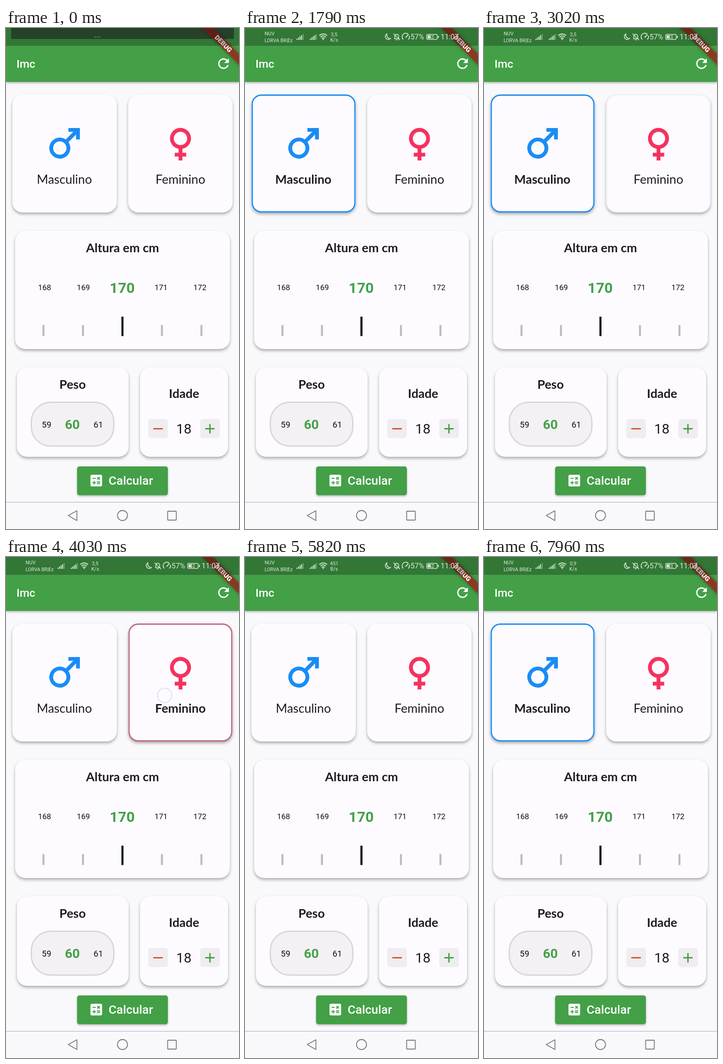
Recreate the animation shown at these times as an HTML page. Size 511 by 1097 pixels, loop 8000 ms.

```html
<!DOCTYPE html>
<html lang="pt">
<head>
<meta charset="utf-8">
<title>Imc</title>
<style>
html, body { margin: 0; width: 100%; height: 100%; overflow: hidden; background: #f9f8fa; }
#stage { position: absolute; left: 0; top: 0; width: 511px; height: 1097px; overflow: hidden; }
#stage > * { position: absolute; box-sizing: border-box; }
svg { left: 0; top: 0; }
.bar { left: 0; top: 0; width: 511px; height: 118px; background: #43a047; box-shadow: 0 2px 5px rgba(0,0,0,.32); }
.card { background: #fdfbff; border-radius: 22px;
  box-shadow: 0 4px 6px rgba(0,0,0,.28), 0 1px 3px rgba(0,0,0,.08); }
.pill { left: 54px; top: 818px; width: 184px; height: 99px; border: 3px solid #dad6da; border-radius: 44px; background: #f3f1f3; }
.step { top: 856px; width: 43px; height: 42px; border-radius: 6px; background: #efedef; }
.calc { left: 156px; top: 960px; width: 199px; height: 63px; border-radius: 5px; background: #43a047;
  box-shadow: 0 2px 4px rgba(0,0,0,.3); }
text { font-family: Roboto, sans-serif; }
.lato { font-family: Lato, sans-serif; font-size: 27px; fill: #1d1b20; }
.mid { text-anchor: middle; }
.b { font-weight: 700; }
</style>
</head>
<body>
<div id="stage">
  <div class="bar"></div>
  <div class="card" style="left:14px;top:146px;width:229px;height:258px"></div>
  <div class="card" style="left:268px;top:146px;width:229px;height:258px"></div>
  <div class="card" style="left:20px;top:444px;width:471px;height:259px"></div>
  <div class="card" style="left:24px;top:743px;width:245px;height:196px"></div>
  <div class="card" style="left:294px;top:743px;width:193px;height:196px"></div>
  <div class="pill"></div>
  <div class="step" style="left:312px"></div>
  <div class="step" style="left:426px"></div>
  <div class="calc"></div>
  <svg width="511" height="1097" viewBox="0 0 511 1097">
    <g id="shade">
      <path d="M11 0H500V21Q500 24 497 24H14Q11 24 11 21Z" fill="#335437" fill-opacity=".95"/>
      <path d="M194 19.500h2.500M199 19.500h2.500M204 19.500h2.500" stroke="#b5c8b5" stroke-width="2"/>
    </g>

    <text x="23" y="87" font-size="24.500" font-weight="500" fill="#fff">Imc</text>
    <path transform="translate(459.500 60.500) scale(1.46)" fill="#fff" d="M17.65 6.35C16.2 4.9 14.21 4 12 4c-4.42 0-7.99 3.58-7.99 8s3.57 8 7.99 8c3.73 0 6.84-2.55 7.73-6h-2.08c-.82 2.33-3.04 4-5.65 4-3.31 0-6-2.69-6-6s2.69-6 6-6c1.66 0 3.14.69 4.22 1.78L13 11h7V4z"/>
    <g transform="translate(511 0) rotate(45)">
      <rect x="-90" y="40" width="180" height="17" fill="#b71c1c" fill-opacity=".66" style="filter:drop-shadow(0 0 4px rgba(0,0,0,.5))"/>
      <text class="mid" y="53.500" font-size="14.500" font-weight="900" fill="#fff">DEBUG</text>
    </g>

    <rect width="511" height="39" fill-opacity=".26"/>
    <g id="info" fill="#dcebdc">
      <text x="43" y="16" font-size="11">NUV</text>
      <text x="43" y="31" font-size="10.500">LORVA BR|Ez</text>
      <g id="signal"></g>
      <g fill="none" stroke="#dcebdc" stroke-width="1.900">
        <path d="M163 16.500Q171.500 9.500 180 16.500M165.500 19.800Q171.500 14.800 177.500 19.800M168 22.800Q171.500 20 175 22.800"/>
        <path d="M311 13A6.500 6.500 0 1 0 319 23A8 8 0 0 1 311 13Z" stroke-width="1.700"/>
        <path d="M327 23.500H338.500M328.500 23V18Q329 14 332.500 13.500Q337 14 337 18V23M331 26H334.500M325.500 12.500L340 26.500" stroke-width="1.500"/>
        <path d="M347 25A7.500 7.500 0 1 1 358 13.500M360.500 17A7.500 7.500 0 0 1 358 25M352 21L358.500 14.500" stroke-width="1.800"/>
        <rect x="398.500" y="14" width="23" height="11" rx="2.500" stroke-width="1.400"/>
      </g>
      <circle cx="171.500" cy="24.800" r="1.500"/>
      <path d="M400.500 16h13v7h-13zM423 17h2v5h-2z"/>
      <path d="M411 14.500L405 20.500H409.500L408 24.500L415 18.500H410.500Z" fill="#317535"/>
      <text id="rate" class="mid" x="195.500" y="17.500" font-size="11"></text>
      <text id="unit" class="mid" x="195.500" y="30" font-size="11"></text>
      <text x="363" y="25" font-size="16">57%</text>
      <text x="429" y="25" font-size="16">11:07</text>
    </g>

    <g fill="none" stroke-width="2.800">
      <rect id="male" x="15.900" y="147" width="225.200" height="255.600" rx="20"/>
      <rect id="female" x="269.900" y="147" width="225.200" height="255.600" rx="20"/>
    </g>
    <path transform="translate(78.200 202.200) scale(4.19)" fill="#1a8cf5" d="M9.5 9a5.5 5.5 0 1 0 4.53 2.38L18 7.42V10h2V4h-6v2h2.58l-3.97 3.97A5.500 5.500 0 0 0 9.500 9zm0 2a3.500 3.500 0 1 1 0 7a3.500 3.500 0 1 1 0-7z" fill-rule="evenodd"/>
    <path transform="translate(332.400 202) scale(4.19)" fill="#f5325f" d="M17.500 9.500a5.500 5.500 0 1 0-6.500 5.400V17H9v2h2v2h2v-2h2v-2h-2v-2.100a5.500 5.500 0 0 0 4.500-5.400zm-9 0a3.500 3.500 0 1 1 7 0a3.500 3.500 0 1 1-7 0z" fill-rule="evenodd"/>
    <text id="maleText" class="lato mid" x="128" y="341">Masculino</text>
    <text id="femaleText" class="lato mid" x="382.500" y="341">Feminino</text>

    <text class="lato mid b" x="255.500" y="490.500">Altura em cm</text>
    <g id="ruler"></g>

    <text class="lato mid b" x="146" y="790">Peso</text>
    <g class="mid" fill="#111">
      <text x="89" y="875" font-size="18.500">59</text>
      <text x="145.500" y="877.500" font-size="28.500" class="b" fill="#43a047">60</text>
      <text x="202.500" y="875" font-size="18.500">61</text>
      <text x="390" y="888" font-size="30" fill="#1d1b20">18</text>
    </g>
    <text class="lato mid b" x="390.500" y="809.500">Idade</text>
    <path d="M323 877.500H344" stroke="#d8572a" stroke-width="3"/>
    <path d="M437 877.500H457.500M447.250 867.250V887.750" stroke="#43a047" stroke-width="3"/>

    <path transform="translate(181 974) scale(1.417)" fill="#fff" fill-rule="evenodd" d="M19 3H5c-1.100 0-2 .9-2 2v14c0 1.100.9 2 2 2h14c1.100 0 2-.9 2-2V5c0-1.100-.9-2-2-2zm-5.970 4.060L14.090 6l1.410 1.410L16.910 6l1.060 1.060-1.410 1.410 1.410 1.410-1.060 1.060-1.410-1.400-1.410 1.410-1.060-1.060 1.410-1.410zM6.250 7.720h5v1.500h-5zM11.500 16h-2v2H8v-2H6v-1.500h2v-2h1.500v2h2zM18 17.250h-5v-1.500h5zM18 14.750h-5v-1.500h5z"/>
    <text x="225" y="1000" font-size="26.500" font-weight="500" fill="#fff">Calcular</text>

    <path d="M0 1038.500H511" stroke="#a9a3cc"/>
    <g fill="none" stroke="#77757a" stroke-width="1.800">
      <path d="M136.500 1067.500L155.500 1057V1078.500Z" stroke-linejoin="round"/>
      <circle cx="255.500" cy="1067.500" r="11"/>
      <rect x="354.500" y="1058" width="19" height="19.500" rx="1"/>
    </g>
    <circle id="touch" r="15.800" fill="#fff" fill-opacity=".15" stroke="#e4e2fa" stroke-width="2.500"/>
  </svg>
</div>
<script>
const LOOP = 8000, FADE = 150, LIFT = 140;
const $ = id => document.getElementById(id);
const clamp = v => Math.max(0, Math.min(1, v));

// [time, selected card after the tap, touch x, touch y]
const taps = [
  [1430, 'male', 118, 300], [2290, 'female', 350, 300], [2875, 'male', 118, 300],
  [3350, '', 118, 300], [3930, 'female', 348, 303], [4350, '', 348, 303],
  [4910, 'male', 118, 300], [5450, '', 118, 300], [6080, '', 478, 80], [6970, 'male', 118, 300]
];
const rates = [[0, '3,5', 'K/s'], [4150, '451', 'B/s'], [7130, '0,9', 'K/s']];
const colors = { male: [26, 140, 245], female: [245, 50, 95] };

let bars = '';
for (const x0 of [113, 142])
  for (let i = 0; i < 5; i++) {
    const h = 2.5 + i * 2.6;
    bars += `<rect x="${x0 + i * 3.4}" y="${26 - h}" width="2" height="${h}" opacity="${i > 3 ? .4 : 1}"/>`;
  }
$('signal').innerHTML = bars;

let ruler = '';
for (let i = 0; i < 5; i++) {
  const main = i === 2, x = 82.2 + i * 86.6, h = main ? 42.5 : 24;
  ruler += `<rect x="${x - 2.2}" y="${674.5 - h}" width="4.4" height="${h}" fill="${main ? '#000' : '#bdbac0'}"/>` +
    `<text class="mid${main ? ' b' : ''}" x="${84.5 + i * 85.2}" y="${main ? 579.5 : 574}" ` +
    `font-size="${main ? 32 : 17}" fill="${main ? '#43a047' : '#111'}">${168 + i}</text>`;
}
$('ruler').innerHTML = ruler;

function level(name, t) {
  let v = 0, prev = '';
  for (const [at, sel] of taps) {
    if (t < at) break;
    const k = clamp((t - at) / FADE);
    if (sel === name && prev !== name) v = k;
    if (sel !== name && prev === name) v = 1 - k;
    prev = sel;
  }
  return v;
}

function draw(t) {
  const last = list => list.filter(e => e[0] <= t).pop();
  const selected = (last(taps) || [0, ''])[1];
  for (const name in colors) {
    const a = level(name, t);
    // the colour fades through transparent black
    $(name).style.stroke = `rgba(${colors[name].map(c => Math.round(c * a))},${a})`;
    $(name + 'Text').style.fontWeight = selected === name ? 700 : 400;
  }
  const [, rate, unit] = last(rates);
  $('rate').textContent = rate;
  $('unit').textContent = unit;

  const open = clamp((t - 40) / 210);
  $('shade').setAttribute('transform', `translate(0 ${-24 * open})`);
  $('shade').setAttribute('opacity', 1 - open);
  $('info').setAttribute('opacity', open);

  const tap = taps.find(([at]) => t > at - 50 && t < at + LIFT);
  $('touch').setAttribute('opacity', tap ? clamp((tap[0] + LIFT - t) / 40) : 0);
  if (tap) {
    $('touch').setAttribute('cx', tap[2]);
    $('touch').setAttribute('cy', tap[3]);
  }
}

const start = performance.now();
function tick() {
  draw((performance.now() - start) % LOOP);
  requestAnimationFrame(tick);
}
draw(0);
requestAnimationFrame(tick);
</script>
</body>
</html>
```
